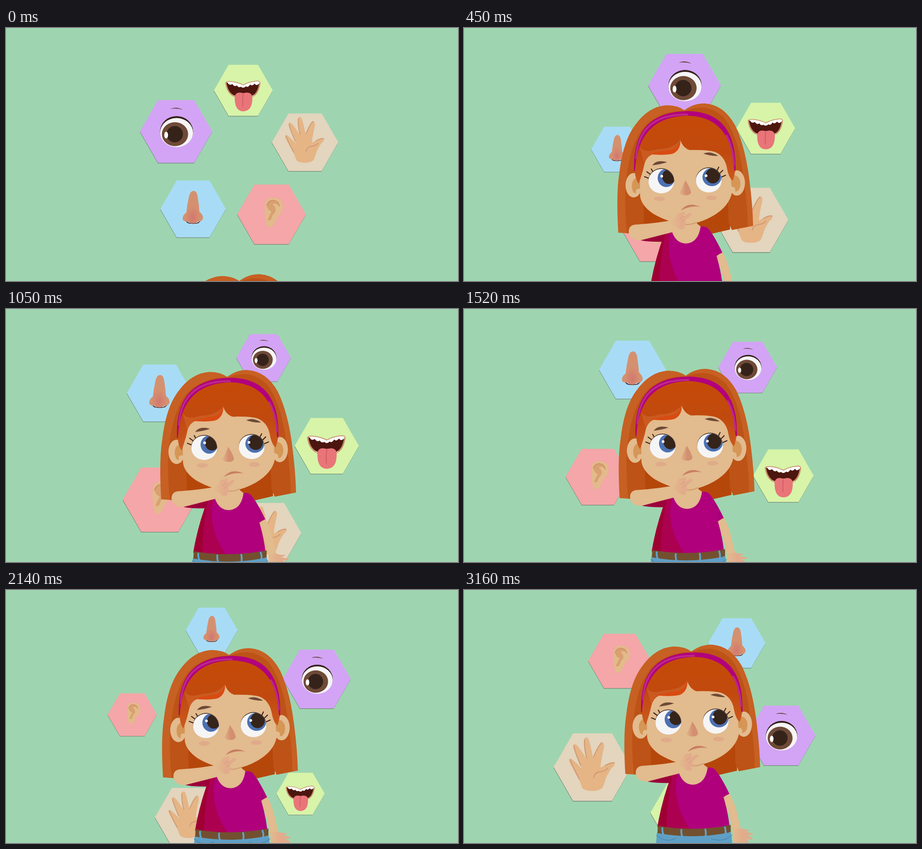
An HTML page for the animation above (3.24 s loop, 999 by 560 pixels).

```html
<!DOCTYPE html>
<html lang="en">
<head>
<meta charset="utf-8">
<title>Five senses</title>
<style>
html, body { margin: 0; width: 100%; height: 100%; overflow: hidden; background: #9ed5b0 }
svg { display: block; width: 100%; height: 100% }
.line { fill: none; stroke-linecap: round }
</style>
</head>
<body>
<svg viewBox="0 0 999 560">
<defs>
  <radialGradient id="blush" cx=".5" cy=".82" r=".36">
    <stop offset="0" stop-color="#d4776f"/><stop offset="1" stop-color="#d4916f"/>
  </radialGradient>
  <linearGradient id="noseShade"><stop offset="0" stop-color="#e0b088"/><stop offset=".55" stop-color="#d38f70"/></linearGradient>
  <linearGradient id="fringe" x2="0" y2="1">
    <stop offset="0" stop-color="#c74d0b"/><stop offset=".55" stop-color="#c1490e"/><stop offset="1" stop-color="#cb5a20"/>
  </linearGradient>
  <linearGradient id="palm"><stop offset="0" stop-color="#e2bb8e"/><stop offset=".5" stop-color="#e2ab8b"/></linearGradient>
  <clipPath id="leftEye"><ellipse cx="438" cy="306" rx="28.5" ry="27"/></clipPath>
  <clipPath id="rightEye"><ellipse cx="543" cy="304" rx="28.5" ry="27"/></clipPath>
  <clipPath id="mouthIn"><path id="lips" d="M-38 -14Q-40 -19 -32 -19Q-16 -19 0 -11Q14 -19 31 -20Q38 -20 36 -13Q31 14 12 15H-14Q-34 10 -38 -14Z"/></clipPath>
  <clipPath id="shirtClip"><path id="shirt" d="M446 421L461 416Q470 444 493 444Q520 442 525 406Q535 405 541 410Q556 428 573 464L560 471Q571 508 574 542Q495 552 414 538Q424 478 446 421Z"/></clipPath>
</defs>

<g id="hexes">
  <g data-size="80" fill="#d3a4f5">
    <path d="M-13 -50Q0 -56 15 -48Q2 -52 -13 -50Z" fill="#5d4038"/>
    <ellipse cx="1" cy="0" rx="36.5" ry="34" fill="#35201c"/>
    <ellipse cx="1" cy="2.5" rx="36.3" ry="32.3" fill="#f6f5f6"/>
    <ellipse cx="-2.5" cy="6" rx="29" ry="26.5" fill="#6f4a38"/>
    <ellipse cx="-3" cy="6" rx="18" ry="18" fill="#35231a"/>
    <ellipse cx="-22" cy="8" rx="4.2" ry="7.5" fill="#fff"/>
  </g>
  <g data-size="65" fill="#d7f4a9">
    <use href="#lips" fill="#4c160f" stroke="#c98d69" stroke-width="3"/>
    <g clip-path="url(#mouthIn)" fill="#fff">
      <path d="M-40 -22H40L34 -14Q28 -9 25 -15Q19 -8 15 -13Q10 -5 6 -9Q0 -3 -5 -8Q-11 -5 -14 -11Q-20 -7 -24 -14Q-31 -10 -34 -16Z"/>
      <path d="M-32 9L-19 12V18H-30ZM30 9L20 12V18H28Z"/>
    </g>
    <path d="M-19 14Q-17 4 -6 5Q0 7 6 5Q18 4 20 14Q21 46 0 46.500Q-20 46 -19 14Z" fill="#e97578"/>
    <path class="line" d="M0 8Q-2 16 -1 35" stroke="#c4555f" stroke-width="1.400"/>
  </g>
  <g data-size="73.5" fill="#e3d5be">
    <g id="openHand">
      <path d="M-19 40Q-22 32 -25 25Q-36 5 -43 -9Q-46 -16 -41 -16Q-36 -14 -20 3Q-30 -20 -36 -36Q-38 -44 -32 -43Q-27 -41 -11 -15Q-17 -38 -16 -50Q-15 -57 -10 -56Q-6 -55 1 -18Q8 -36 14 -44Q18 -49 21 -45Q23 -42 21 -34Q17 -18 15 1Q24 -4 32 -8Q40 -11 42 -7Q42 -3 36 2Q28 14 25 22Q22 34 18 40Q10 46 -2 45Q-14 45 -19 40Z" fill="#e5b586"/>
      <path class="line" d="M2 20Q4 10 14 9Q24 8 29 2M-42 -14Q-38 -2 -25 22M-35 -41Q-34 -30 -22 -3M-15 -52Q-16 -36 -11 -17M17 -46Q9 -37 2 -19M24 -3Q34 -9 41 -8" stroke="#d09b77" stroke-width="2"/>
    </g>
  </g>
  <g data-size="76" fill="#f4a6a8">
    <path d="M-15 -22Q-12 -38 6 -37Q25 -35 25 -18Q25 -5 14 5Q9 12 5 23Q0 30 -6 29Q-13 27 -14 5Q-16 -10 -15 -22Z" fill="#e3ba8b"/>
    <path d="M-11 -22Q-7 -33 4 -32Q17 -30 18 -17Q10 -27 2 -22Q12 -14 8 -5Q2 0 -1 11Q-5 15 -9 12Q-5 2 0 -6Q-10 -10 -11 -22Z" fill="#d9a071"/>
    <path class="line" d="M-11 -20Q-6 -32 5 -31Q16 -29 17 -18" stroke="#c98d64" stroke-width="1.500"/>
  </g>
  <g data-size="72.5" fill="#a8dcf6">
    <path d="M-17 26Q-8 34 0 31Q9 34 17 26L12 31Q0 34 -12 31Z" fill="#4e1d18" stroke="#4e1d18"/>
    <path d="M-9 -28Q-6 -40 1 -40Q8 -40 10 -28Q13 -10 14 6Q22 13 22 20Q21 27 13 28Q8 28 5 31Q0 33 -6 31Q-9 28 -14 28Q-24 27 -23 20Q-22 13 -15 8Q-13 -10 -9 -28Z" fill="url(#blush)"/>
  </g>
</g>

<g id="girl">
  <!-- hair behind the head -->
  <path d="M397 330H590V413L547 423L397 420Z" fill="#b6470b"/>
  <path d="M343 420Q338 335 345 290Q353 218 380 182Q410 140 450 138Q474 138 489 149Q510 133 535 134Q576 137 601 182Q624 230 633 305Q640 360 641 405L594 414L587 397L586 350H398L400 424Z" fill="#c76023"/>
  <path d="M362 421Q354 335 363 285Q374 205 412 174Q450 148 489 151Q540 130 576 165Q609 205 620 300Q629 360 629 407L594 414L587 397V300H398L400 424Z" fill="#bd5316"/>

  <!-- hanging arm -->
  <path d="M556 462L573 462Q586 486 591 512L598 541L584 580Q582 545 573 512Z" fill="#e2bb8e"/>
  <path d="M580 543L597 540Q608 544 616 543Q618 546 607 549Q622 549 626 554Q620 556 611 555Q624 560 625 566Q616 566 610 562Q618 570 613 574Q600 568 596 576Q586 580 581 564Z" fill="url(#palm)"/>

  <!-- body -->
  <path d="M392 437Q422 426 464 412L445 440Q415 441 392 437Z" fill="#9c003a"/>
  <path d="M461 385H517V400L526 407Q530 448 493 449Q465 448 459 414Z" fill="#e2bb8e"/>
  <path d="M413 550H577L583 610H408Z" fill="#5f9fc5"/>
  <path d="M412 556Q432 574 456 562M534 564Q560 572 579 556" class="line" stroke="#4b86ae" stroke-width="1.500"/>
  <use href="#shirt" fill="#b0007c"/>
  <g clip-path="url(#shirtClip)">
    <path d="M400 410H463Q450 440 457 475Q464 515 492 550H400Z" fill="#ac0051"/>
    <path d="M400 410H450Q433 480 434 550H400Z" fill="#9f0033"/>
  </g>
  <path class="line" d="M551 424Q565 455 562 471" stroke="#960068"/>
  <path d="M415 535Q495 549 576 533L576 549Q495 566 414 551Z" fill="#72502f"/>
  <path class="line" d="M425 540Q424 548 428 556M467 544Q466 551 469 560M520 543Q522 551 520 560M563 538Q566 546 564 555" stroke="#5fa2c8" stroke-width="4"/>

  <!-- head -->
  <ellipse cx="377" cy="315" rx="18" ry="27" fill="#e2bb8e"/>
  <path d="M391 297Q373 298 373 317Q374 333 382 333Q380 321 391 323Z" fill="#d59656"/>
  <ellipse cx="605" cy="310" rx="18" ry="28" fill="#e2bb8e"/>
  <path d="M592 291Q612 292 613 311Q612 329 601 329Q604 318 592 318Z" fill="#d59656"/>
  <path d="M392 300Q400 215 490 208Q580 214 592 300L594 332Q588 362 552 383Q520 401 494 401Q458 400 420 378Q391 358 391 335Z" fill="#e2bb8e"/>
  <path class="line" d="M492 402Q504 403 516 397" stroke="#d09a70" stroke-width="2"/>

  <path d="M380 285Q383 158 495 157Q598 160 601 285Q598 300 596 305Q587 299 583 276Q578 250 556 241Q540 236 500 237Q486 232 480 215Q481 234 463 243Q445 248 418 246Q403 254 400 272Q396 290 388 312Q380 300 380 285Z" fill="url(#fringe)"/>
  <path d="M412 214Q416 165 490 161Q575 158 592 230Q550 203 482 209Q440 214 412 214Z" fill="#c54b0a" opacity=".65"/>
  <path d="M391 230Q400 245 430 235Q466 234 480 214Q482 235 464 244Q444 249 421 246Q404 252 401 266Q394 247 391 230Z" fill="#cf6129" opacity=".7"/>
  <path d="M410 246Q440 239 462 236Q476 230 480 215Q481 237 464 245Q444 250 410 246Z" fill="#d84b12"/>
  <path d="M378 284Q372 153 495 151Q606 151 602 284L599 281Q594 163 495 161Q386 164 380 283Z" fill="#b2007c"/>
  <path class="line" d="M382 255Q389 157 495 158.500M582 205Q597 232 599 270" stroke="#ba2a8d" stroke-width="4"/>

  <path d="M418 271Q428 257 451 264Q436 269 418 271Z" fill="#6d4a36"/>
  <path d="M531 245Q546 238 564 250Q547 251 531 245Z" fill="#6d4a36"/>
  <path class="line" d="M411 300L401 296M414 291L406 285M420 286L416 279M571 297L580 293M567 289L574 282M561 283L565 275" stroke="#3a2118" stroke-width="2.200"/>
  <ellipse cx="438" cy="304.500" rx="28.500" ry="27" fill="#35231a"/>
  <ellipse cx="543" cy="302.500" rx="28.500" ry="27" fill="#35231a"/>
  <g clip-path="url(#leftEye)">
    <rect x="405" y="275" width="65" height="62" fill="#f6f5f6"/>
    <ellipse cx="449" cy="299" rx="19" ry="20" fill="#4d71b1"/>
    <ellipse cx="455" cy="296" rx="15" ry="16" fill="#35241a"/>
  </g>
  <g clip-path="url(#rightEye)">
    <rect x="510" y="273" width="65" height="62" fill="#f6f5f6"/>
    <ellipse cx="550" cy="297" rx="21" ry="20" fill="#4d71b1"/>
    <ellipse cx="552" cy="294" rx="16" ry="17" fill="#35241a"/>
  </g>
  <circle cx="439" cy="295" r="3" fill="#fff"/>
  <circle cx="537" cy="294" r="3" fill="#fff"/>

  <path d="M491 304Q502 320 504 331Q501 338 491 337Q481 337 479 331Q485 320 491 304Z" fill="url(#noseShade)"/>
  <ellipse cx="434" cy="345" rx="12" ry="5" fill="#dfab89"/>
  <ellipse cx="549" cy="343" rx="12" ry="5" fill="#dfab89"/>
  <path d="M481 371Q497 350 525 363Q503 359 481 371Z" fill="#c77e62"/>

  <!-- arm held to the chin -->
  <path d="M384 402Q366 402 366 418Q367 437 392 437L470 417V391Q430 399 384 402Z" fill="#e2bb8e"/>
  <path d="M460 393Q470 388 473 379Q477 374 481 377L488 373Q492 376 487 384L500 377Q506 377 504 382L490 393Q495 400 490 404Q492 412 484 413Q475 412 470 405L460 402Z" fill="url(#palm)"/>
  <path class="line" d="M478 390L488 384M482 396L491 391" stroke="#d29b7b"/>
</g>
</svg>
<script>
const LOOP = 3240;
// Clock: the picture steps 42 times per loop at slightly uneven intervals.
const stepTimes = [0, 70, 520, 600, 1050, 1130, 1600, 1680, 2140, 2220, 2700, 2780, 3160, LOOP];
const stepNumbers = [0, 1, 7, 8, 14, 15, 21, 22, 28, 29, 35, 36, 41, 42];
// Poses: [x, y, half width] of each hexagon at the key steps.
const keySteps = [0, 6, 14, 20, 28, 34, 41];
const poses = [
  [[376, 229, 80], [487.5, 127, 80.5], [569.5, 108, 60.5], [627, 129, 65], [687, 197, 75], [704, 255, 73], [701, 322, 76]],
  [[524.5, 138, 65], [667, 222, 65], [709, 303, 71], [706, 369, 67], [651, 451, 53.5], [578, 485, 70], [490, 493, 78]],
  [[661, 253, 73.5], [635, 425, 82], [576, 496, 77], [500, 512, 72], [404, 503, 75], [337.5, 462, 86.5], [284, 392, 86]],
  [[587, 412.5, 76], [429, 447, 80], [340, 422, 82], [296, 371.5, 71.5], [279, 276, 54.5], [303, 213.5, 62], [344, 157, 69.5]],
  [[413.5, 400.5, 72.5], [338.5, 268.5, 57.5], [339.5, 186, 72.5], [372.5, 134.5, 74], [454.5, 89, 57.5], [530, 88.5, 57.5], [603, 117.5, 63.5]]
];
const girlX = [26.5, -2, 0, 1, 4, 8, 13.5];
const centre = { x: 500, y: 298 };

const mix = (a, b, u) => a + (b - a) * u;
function locate(list, v) {
  let i = 0;
  while (i < list.length - 2 && v >= list[i + 1]) i++;
  return [i, (v - list[i]) / (list[i + 1] - list[i])];
}
const settle = u => .3 * u + .7 * (1 - Math.exp(-2.5 * u)) / (1 - Math.exp(-2.5));

function orbit([x1, y1, s1], [x2, y2, s2], u) {
  const polar = (x, y) => [Math.atan2(y - centre.y, x - centre.x), Math.hypot(x - centre.x, y - centre.y)];
  const [a1, r1] = polar(x1, y1), [a2, r2] = polar(x2, y2);
  const turn = (a2 - a1 + 2 * Math.PI) % (2 * Math.PI);
  const a = a1 + turn * u, r = mix(r1, r2, u);
  return [centre.x + r * Math.cos(a), centre.y + r * Math.sin(a), mix(s1, s2, u)];
}

const girl = document.getElementById("girl");
const hexes = [...document.getElementById("hexes").children];
for (const hex of hexes) {
  const s = +hex.dataset.size, h = s * .868;
  const d = `M${-s} 0L${-s / 2} ${-h}H${s / 2}L${s} 0L${s / 2} ${h}H${-s / 2}Z`;
  hex.insertAdjacentHTML("afterbegin",
    `<path d="${d}" fill="#708878" transform="translate(-.3 1.3)"/><path d="${d}"/>`);
}

function draw(now) {
  const [c, cu] = locate(stepTimes, now % LOOP);
  const step = Math.min(41, Math.floor(mix(stepNumbers[c], stepNumbers[c + 1], cu) + .15));
  const [k, linear] = locate(keySteps, step);
  const u = k ? linear : settle(linear);
  hexes.forEach((hex, i) => {
    const [x, y, s] = orbit(poses[i][k], poses[i][k + 1], u);
    hex.setAttribute("transform", `translate(${x} ${y}) scale(${s / hex.dataset.size})`);
  });
  const drift = 13 * (Math.max(0, step - 14) / 27) ** 1.4;
  const y = 411 * Math.exp(-.42 * step) - drift;
  girl.setAttribute("transform", `translate(${mix(girlX[k], girlX[k + 1], u)} ${y})`);
}
const start = performance.now();
(function tick() {
  draw(performance.now() - start);
  requestAnimationFrame(tick);
})();
</script>
</body>
</html>
```
